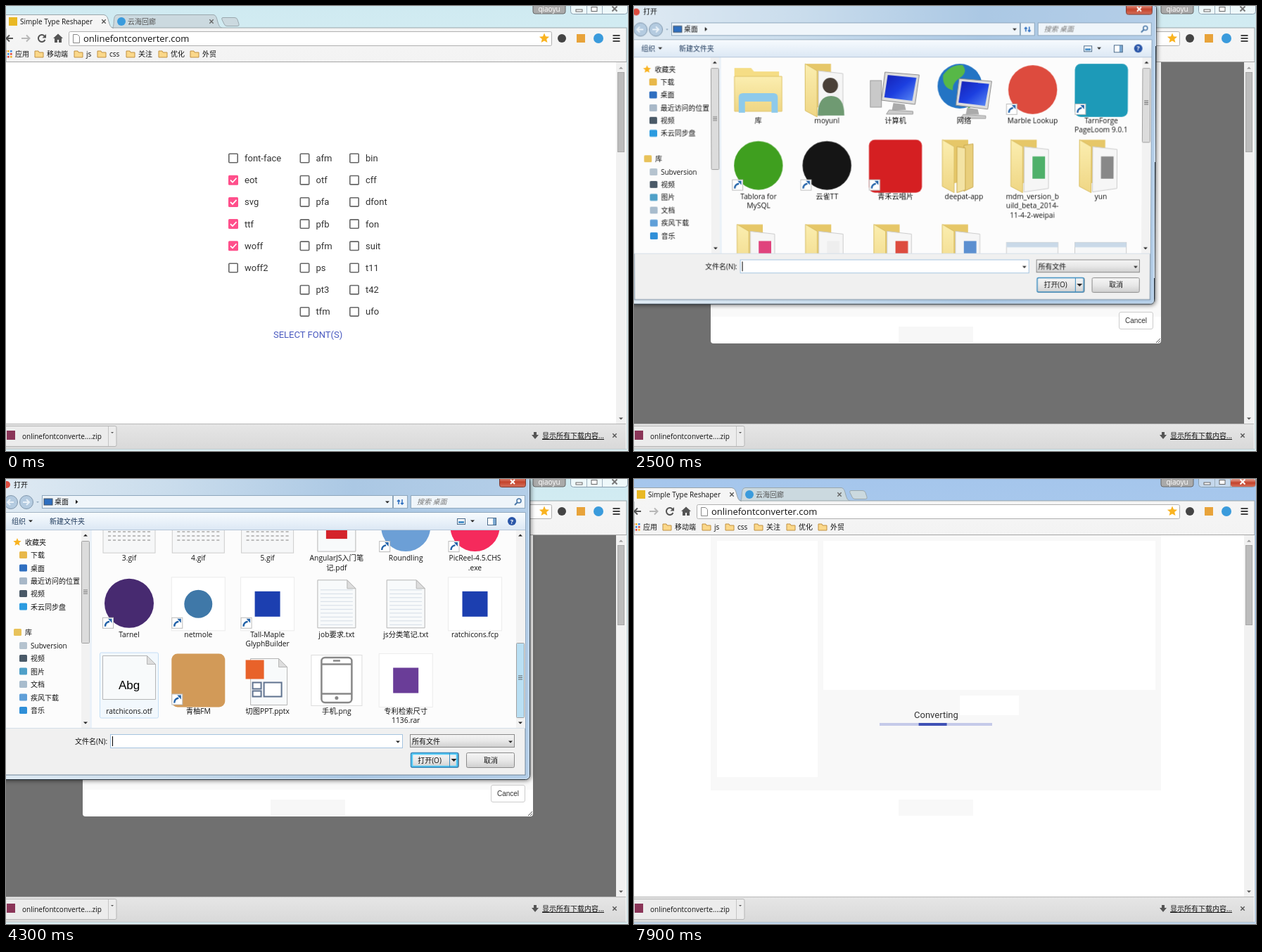
These frames come from a looping animation (884 px wide and 633 px high, 8000 ms). An HTML page:

```html
<!DOCTYPE html>
<html lang="zh-CN">
<head>
<meta charset="utf-8">
<title>Font upload</title>
<style>
html, body { margin: 0; width: 100%; height: 100%; overflow: hidden; background: #fff; }
svg.layer { position: absolute; left: 0; top: 0; overflow: visible; }
text { font-family: "Open Sans", "Noto Sans CJK SC", "Noto Sans CJK", sans-serif; white-space: pre; }
.page text { font-family: Roboto, sans-serif; }
.modal text, text.sample { font-family: "Liberation Sans", Arial, sans-serif; }
#dialog { transform-origin: 371px 213px; }
</style>
</head>
<body>
<script>
const rect = (x, y, w, h, fill, more = '') => `<rect x="${x}" y="${y}" width="${w}" height="${h}" fill="${fill}" ${more}/>`;
const circle = (x, y, r, fill, more = '') => `<circle cx="${x}" cy="${y}" r="${r}" fill="${fill}" ${more}/>`;
const path = (d, fill, more = '') => `<path d="${d}" fill="${fill}" ${more}/>`;
const line = (d, color, width = 1, more = '') => path(d, 'none', `stroke="${color}" stroke-width="${width}" ${more}`);
const text = (x, y, s, size = 10, fill = '#111', more = '') => `<text x="${x}" y="${y}" font-size="${size}" fill="${fill}" ${more}>${s}</text>`;
const group = (id, body, more = '') => `<g id="${id}" ${more}>${body}</g>`;
const at = (x, y, body) => `<g transform="translate(${x} ${y})">${body}</g>`;
const layer = (id, body) => `<svg class="layer" id="${id}" width="884" height="633">${body}</svg>`;
const gradient = (id, x2, y2, colors) => `<linearGradient id="${id}" x2="${x2}" y2="${y2}">${colors.map((c, i) =>
  `<stop offset="${i / (colors.length - 1)}" stop-color="${c}"/>`).join('')}</linearGradient>`;
const fade = (id, ...colors) => gradient(id, 0, 1, colors);
const down = (x, y, fill = '#222', s = 3) => path(`M${x - s} ${y - s / 2}h${2 * s}l${-s} ${s}z`, fill);
const up = (x, y, fill = '#222', s = 3) => path(`M${x - s} ${y + s / 2}h${2 * s}l${-s} ${-s}z`, fill);
const cross = (x, y, s, color, w = 1.4) => line(`M${x - s} ${y - s}l${2 * s} ${2 * s}m0 ${-2 * s}l${-2 * s} ${2 * s}`, color, w);
const star = (x, y, r) => path('M' + Array.from({ length: 10 }, (_, i) => {
  const a = i * Math.PI / 5, d = i % 2 ? r * .45 : r;
  return `${x + d * Math.sin(a)} ${y - d * Math.cos(a)}`;
}).join('L') + 'z', '#f9b320');
const tinyFolder = (x, y) => path(`M${x} ${y - 4}h5l1 2h6v7h-12z`, '#fbd88a', 'stroke="#c09040"');

// Browser window
const defs = `<defs>
  ${fade('idle', '#cfeaf1', '#eefafb', '#dff2f6')}${fade('active', '#a5c6ec', '#b9d3ef', '#c4d9f0')}
  ${fade('bar', '#f5f5f5', '#dedede')}${fade('shelf', '#e6e6e6', '#d9d9d9')}
  ${gradient('glass', 1, 0, ['#dfeaf3', '#c9dcec', '#abc8e4', '#b4cee8'])}${fade('tools', '#f7fbfe', '#dbe7f4')}
  ${fade('button', '#f5f5f5', '#e8e8e8', '#cfcfcf')}${fade('red', '#e6a697', '#c4432c', '#d4705c')}
  ${fade('cover', '#fbeeb0', '#efd684')}${gradient('screen', 1, 1, ['#1420b4', '#1c3fe0', '#5d8cf5'])}
</defs>`;

const winButton = id => rect(802.5, -4, 81, 15.5, id === 'on' ? '#c5d8ec' : '#eef8fa', 'rx="4" stroke="#8aa0b0"') +
  (id === 'on' ? rect(848, 0, 35, 11, 'url(#red)', 'rx="3"') : '') +
  line('M825.5 0v11M847.5 0v11', '#9fb2c0') + rect(810, 5, 9, 3, '#fff', 'stroke="#666"') +
  rect(832, 1.5, 8, 6, '#fff', 'stroke="#666"') +
  cross(865, 4, 3.5, id === 'on' ? '#fff' : '#777', 2);

const bookmarks = [[41, '移动端'], [97, 'js'], [130, 'css'], [171, '关注'], [217, '优化'], [262, '外贸']];
const dots = ['#e2483d', '#f3b32a', '#3f8de0'];

const browser = rect(0, 0, 884, 633, 'url(#idle)') +
  group('activeTitle', rect(0, 0, 884, 633, 'url(#active)') + winButton('on')) +
  group('idleTitle', winButton('off')) +
  rect(749, -4, 46, 15, '#aaa', 'rx="3" stroke="#666"') +
  text(772, 8, 'qiaoyu', 10, '#fff', 'text-anchor="middle"') +
  path('M150 31.5C156 31 150 13 158 12.5H295C302 13 299 31 308 31.5z', '#cbd9df', 'stroke="#9aa8ae"') +
  path('M308 16.500h17q3 0 4 3l2 6q1 3-2 3h-15q-3 0-4-3l-3-6q-1-3 1-3z', '#cbd9df', 'stroke="#9aa8ae"') +
  rect(0, 31, 882, 599, 'url(#bar)', 'stroke="#9aa5aa"') + rect(0, 80, 882, 550, '#fff') +
  path('M-5 32V13H139C148 13 144 31 153 32z', '#f5f5f5') + line('M0 12.500H139C148 13 144 31 153 31.500', '#9aa5aa') +
  rect(4, 16, 12, 12, '#e9b824') + text(20, 26, 'Simple Type Reshaper', 10) + cross(139, 22, 2.7, '#555') +
  circle(164, 22, 6, '#3a9bdc') + text(173, 26, '云海回廊', 10, '#555') + cross(292, 22, 2.7, '#666') +
  line('M10 46H1M5 41.500L0.500 46L5 50.500', '#555', 2) + line('M22 46H33M29 41.500L33.500 46L29 50.500', '#b8b8b8', 2) +
  line('M55 43A5 5 0 1 0 55.500 48', '#555', 2) + path('M57 40v5.500h-5.500z', '#555') +
  path('M74 39.500l7 6.500h-2v6h-4v-4h-2v4h-4v-6h-2z', '#555') +
  rect(89.5, 36.5, 686, 20, '#fff', 'rx="2" stroke="#b0b0b0"') +
  path('M95.500 40.500h6l3 3v9h-9z', '#fff', 'stroke="#888"') + text(110, 51, 'onlinefontconverter.com', 13) +
  star(765, 46, 7.5) + circle(790, 46, 6, '#444') + rect(811, 40, 12, 12, '#e8a33a') + circle(842, 46, 7, '#3a9bdc') +
  line('M862.500 42h10M862.500 46h10M862.500 50h10', '#444', 2) +
  [0, 1, 2, 3, 4, 5, 6, 7, 8].map(i => rect(-2 + i % 3 * 4, 63 + (i / 3 | 0) * 4, 2.6, 2.6, dots[(i + (i / 3 | 0)) % 3])).join('') +
  text(13, 72, '应用') + bookmarks.map(([x, s]) => tinyFolder(x, 68) + text(x + 17, 72, s)).join('') +
  rect(0, 79, 882, 1, '#a5a5a5') +
  rect(867, 80, 14, 514, '#f1f1f1') + up(874, 88, '#999') + down(874, 587, '#555') +
  rect(869.5, 94.5, 9, 113, '#bcbcbc', 'stroke="#a8a8a8"') +
  rect(0, 594, 881, 36, 'url(#shelf)') + rect(0, 594, 881, 1, '#b8b8b8') +
  rect(-3, 597.5, 160, 29, '#ececec', 'rx="2" stroke="#b5b5b5"') + line('M145.500 598v28', '#c4c4c4') +
  rect(1, 604, 12, 13, '#8a3558') + text(23, 615.5, 'onlinefontconverte....zip') + down(151, 607, '#555', 2) +
  path('M750 606h4v4h3l-5 6l-5-6h3z', '#555') +
  text(762, 615, '显示所有下载内容...', 10, '#111', 'text-decoration="underline"') + cross(865, 611, 2.7, '#555');

// Web page
const formats = [[316, 'font-face eot svg ttf woff woff2'], [417.5, 'afm otf pfa pfb pfm ps pt3 tfm'], [488, 'bin cff dfont fon suit t11 t42 ufo']];
const option = (x, y, name, on) => (on
  ? rect(x, y - 7, 14, 14, '#ff4f8b', 'rx="1.500"') + line(`M${x + 3} ${y}l3 3l5.500-6`, '#fff', 1.7)
  : rect(x + .8, y - 6.2, 12.4, 12.4, '#fff', 'rx="1" stroke="#666" stroke-width="1.600"')) + text(x + 23, y + 4.5, name, 13, '#333');
const form = formats.map(([x, names], c) => names.split(' ').map((name, i) =>
  option(x, 216.5 + 31.2 * i, name, !c && i > 0 && i < 5)).join('')).join('');
const page = group('form', form + group('hoverBox', rect(376, 456, 106, 23, '#f7f7f7')) +
    text(380, 472, 'SELECT FONT(S)', 13, '#4a5ac0', 'id="select"')) +
  group('working', rect(109, 80, 640, 363, '#f8f8f8') + rect(118, 88, 143, 336, '#fff') + rect(269, 88, 472, 212, '#fff') +
    rect(463, 308, 84, 28, '#fff') + rect(376, 456, 106, 23, '#f8f8f8') +
    group('progress', text(398, 340, 'Converting', 13, '#333') +
      `<svg x="349" y="347" width="160" height="4">${rect(0, 0, 160, 4, '#c5cae9')}${rect(0, 0, 40, 4, '#3f51b5', 'id="runner"')}</svg>`));

// Upload overlay
const button = (x, y, w, h, label, fill, stroke, color, size, id) =>
  rect(x + .5, y + .5, w - 1, h - 1, fill, `rx="2.500" stroke="${stroke}" id="${id}"`) +
  text(x + w / 2, y + h / 2 + size * .36, label, size, color, 'text-anchor="middle"');
const modal = rect(0, 80, 867, 514, '#000', 'opacity=".56"') +
  path('M109 80H749V476q0 4-4 4H113q-4 0-4-4z', '#fff') + group('tint', rect(109, 80, 640, 362, '#f9f9f9')) +
  rect(376, 456, 106, 23, '#f7f7f7') +
  rect(118, 88.5, 143, 335, '#f5f5f5', 'rx="3" stroke="#e3e3e3"') + rect(118, 93, 7, 28, '#08c') +
  text(136.5, 111, 'My device', 11.4, '#222') + text(130, 139.5, 'Link (URL)', 11.4, '#222') +
  rect(269.5, 88.5, 471, 211.5, '#f7f7f7', 'rx="3" stroke="#222" stroke-dasharray="3 2"') +
  text(414, 204, 'Drop files here', 27.9, '#333') +
  button(463, 308, 84, 28, 'Choose files', '#428bca', '#357ebd', '#fff', 11.4, 'choose') +
  group('cancel', button(602, 435, 49, 25, 'Cancel', '#fff', '#ccc', '#333', 10, 'cancelBox')) +
  group('chosen', path('M117.500 436.500h14l8 8v20h-22z', '#fff', 'stroke="#777"') +
    line('M131.500 436.500v8h8', '#777') + line('M120 447h16M120 451h17M120 455h17M120 441h9', '#bbb', 1.5) +
    text(143, 453.5, 'one file selected', 11.4, '#428bca') +
    button(654, 435, 42, 25, 'Clear', '#d9534f', '#d43f3a', '#fff', 10, 'clear') +
    group('done', button(699, 435, 42, 25, 'Done', '#5cb85c', '#4cae4c', '#fff', 10, 'doneBox'))) +
  line('M742 479l6-6M745 479l3-3', '#555');

// File icons, drawn around their centre
const sheet = (w, h, inner = '') => path(`M${-w / 2} ${-h / 2}h${w - 12}l12 12v${h - 12}h${-w}z`, '#f8fafb', 'stroke="#b5b5b5"') +
  path(`M${w / 2 - 12} ${-h / 2}v12h12z`, '#ddd', 'stroke="#b5b5b5"') + inner;
const card = inner => rect(-38, -38, 76, 76, '#fff', 'stroke="#ececec"') + inner;
const monitor = (x, y, s) => `<g transform="translate(${x} ${y}) scale(${s})">` +
  path('M-20-24L29-20L23 22L-25 16z', '#dedede', 'stroke="#888"') + path('M-16-20L25-16L19 17L-21 12z', 'url(#screen)') +
  path('M-8 20l16 2l2 8h-20z', '#aaa') + path('M-14 30l34 2v4h-38z', '#ccc', 'stroke="#999"') + '</g>';
const icons = {
  round: (c, r = 35) => circle(0, -1, r, c),
  square: (c, s = 76) => rect(-s / 2, -s / 2, s, s, c, `rx="${s / 9}"`),
  cardRound: c => card(circle(0, 0, 20, c)),
  cardSquare: c => card(rect(-18, -18, 36, 36, c)),
  folder: c => path('M-30-38H6V20L-30 28z', '#e6c768') +
    (c ? path('M-12-28L23-24V32L-12 37z', '#f6f6f6', 'stroke="#ccc"') + rect(0, -14, 18, 32, c)
      : path('M0-30L13-32V30L0 36z', '#e9cf7c', 'stroke="#c9a94e"') + path('M-10-28L2-26V34L-10 38z', '#f3e3a4', 'stroke="#c9a94e"')) +
    path('M-31-38L-14-28V38L-31 29z', 'url(#cover)', 'stroke="#d8bd62"'),
  library: () => path('M-34-32h24l4 5h36v56h-64z', '#f5dd85') + path('M-34-20H34V30H-34z', 'url(#cover)', 'stroke="#e0c468"') +
    path('M-28 32V10q0-6 6-6h44q6 0 6 6v22h-9V16h-38v16z', '#8ecaeb'),
  person: () => icons.folder('#f1f1f1') + circle(5, -7, 11, '#4a4038') + path('M-13 36q0-28 19-28t19 28z', '#6f9a72'),
  computer: () => rect(-36, -14, 16, 38, '#c9c9c9', 'stroke="#999"') + monitor(5, -2, 1),
  network: () => circle(-6, -6, 32, '#2374c4') + path('M-30-22q12-16 28-14q8 10-4 18t-10 18q-16-4-14-22zM2 4q16-8 22-2q-4 18-18 24z', '#57b847') + monitor(12, 6, .95),
  shot: () => rect(-37, -12, 74, 48, '#f6f7f8', 'stroke="#ccc"') + rect(-37, -12, 74, 7, '#c9d9e8') + line('M-30 6h60M-30 12h60M-30 18h60', '#bbb', 2, 'stroke-dasharray="4 3"'),
  page: c => sheet(54, 68, c ? rect(-15, -1, 30, 17, c) : line(Array.from({ length: 10 }, (_, i) => `M-23 ${-20 + i * 5.5}h46`).join(''), '#d4dde6')),
  font: () => at(0, -4, sheet(75, 62, `<text class="sample" y="16" text-anchor="middle" font-size="17">Abg</text>`)),
  slides: c => at(2, 2, sheet(52, 66)) + rect(-21, 3, 12, 9, '#fff', 'stroke="#60738f" stroke-width="2"') + rect(-5, 3, 25, 20, '#fff', 'stroke="#60738f" stroke-width="2"') +
    rect(-21, 15, 12, 8, '#fff', 'stroke="#60738f" stroke-width="2"') + rect(-31, -29, 26, 27, c),
  phone: () => rect(-36, -36, 72, 72, '#fff', 'stroke="#ddd"') + rect(-21.5, -32.5, 43, 64, '#fff', 'rx="5" stroke="#888" stroke-width="2.500"') +
    line('M-21-23h42M-21 19h42M-5-28h10', '#888', 2.5) + circle(0, 25, 2.5, '#888'),
};
const link = at(-38, 19, rect(.5, .5, 15, 15, '#fff', 'stroke="#bbb"') + line('M4 13Q4 7 10 6', '#2463a8', 2.4) + path('M8 2h5.500v6z', '#2463a8'));

// label, icon, colour, shortcut
const files = [
  ['库', 'library'], ['moyunl', 'person'], ['计算机', 'computer'], ['网络', 'network'], ['Marble Lookup', 'round', '#dd4b3e', 1], ['TarnForge|PageLoom 9.0.1', 'square', '#1d9ab8', 1],
  ['Tablora for|MySQL', 'round', '#3f9f1f', 1], ['云雀TT', 'round', '#151515', 1], ['青禾云唱片', 'square', '#d51f22', 1], ['deepat-app', 'folder'], ['mdm_version_b|uild_beta_2014-|11-4-2-weipai', 'folder', '#4fb06a'], ['yun', 'folder', '#888'],
  ['css', 'folder', '#e0437d'], ['demo', 'folder', '#eee'], ['html', 'folder', '#dd4b3e'], ['docs', 'folder', '#5b8fd0'], ['1.gif', 'shot'], ['2.gif', 'shot'],
  ['3.gif', 'shot'], ['4.gif', 'shot'], ['5.gif', 'shot'], ['AngularJS入门笔|记.pdf', 'page', '#d4232b'], ['Roundling', 'round', '#6c9fd6', 1], ['PicReel-4.5.CHS|.exe', 'round', '#f52a5c', 1],
  ['Tarnel', 'round', '#472a70', 1], ['netmole', 'cardRound', '#3f78a8', 1], ['Tall-Maple|GlyphBuilder', 'cardSquare', '#1c3fb0', 1], ['job要求.txt', 'page'], ['js分类笔记.txt', 'page'], ['ratchicons.fcp', 'cardSquare', '#1c3fb0'],
  ['ratchicons.otf', 'font'], ['青柚FM', 'square', '#d29a58', 1], ['切图PPT.pptx', 'slides', '#e8622a'], ['手机.png', 'phone'], ['专利检索尺寸|1136.rar', 'cardSquare', '#6a3d98']];
const place = i => [175 + i % 6 * 98.3, 120 + (i / 6 | 0) * 108.7 + (i > 11 ? 13 : 0)];
const hover = (id, i) => at(...place(i), rect(-41.5, -39.5, 83, 93, '#f2f8fd', `rx="2" stroke="#c4def5" id="${id}"`));
const fileItem = ([label, kind, color, shortcut], i) => at(...place(i), icons[kind](color) + (shortcut ? link : '') +
  label.split('|').map((s, n) => text(0, 47 + n * 13.5, s, 10.3, '#111', 'text-anchor="middle"')).join(''));

// Open dialog
const places = [['收藏夹', 94, '#f5a623'], ['下载', 112, '#e8b84a'], ['桌面', 130.5, '#2f6fc0'], ['最近访问的位置', 149, '#a8b8c8'], ['视频', 167, '#4a5a68'], ['禾云同步盘', 185.5, '#2b9be0'],
  ['库', 222, '#e8c25a'], ['Subversion', 241, '#b5c3cf'], ['视频', 259, '#4a5a68'], ['图片', 277.5, '#4fa0c8'], ['文档', 296, '#a8bccd'], ['疾风下载', 314.5, '#5f9fd8'], ['音乐', 333, '#2f8fd8']];
const placeItem = ([s, y, c], i) => {
  const x = i && i !== 6 ? 35 : 27;
  return (i ? rect(x - 16, y - 9, 11, 10, c, 'rx="1.500"') : star(16, y - 4, 6)) + text(x, y, s, 10);
};
const winBox = (x, w, s, cx) => rect(x + .5, 389.5, w, 21, 'url(#button)', 'rx="2" stroke="#8a8a8a"') + text(cx, 403.5, s, 10, '#111', 'text-anchor="middle"');
const dialog = rect(-10, -3, 754.5, 430.5, 'url(#glass)', 'rx="6" stroke="#26323d" style="filter:drop-shadow(1px 1px 3px #0008)"') +
  line('M743.500 0V422q0 4-4 4.500H0', '#e4f0fa', 1, 'opacity=".7"') +
  circle(1, 8, 5, '#dd4b3e') + text(11, 11.5, '打开') + rect(701.5, -3, 37, 14.5, 'url(#red)', 'rx="3" stroke="#7a3a30"') + cross(720, 4, 3, '#fff', 2) +
  circle(7, 33, 9.5, '#b4cbe0', 'stroke="#8198ad"') + circle(29, 33, 9.5, '#b4cbe0', 'stroke="#8198ad"') + down(45, 33, '#8fa8bd', 2) +
  line('M11 33H2M6 29l-4 4l4 4M24 33h9M29 29l4 4l-4 4', '#e9f1f8', 2) +
  rect(51.5, 23.5, 498, 18, '#eff5fa', 'stroke="#8ea7bd"') + rect(54, 28, 12, 9, '#2f6fc0', 'stroke="#456"') + text(69, 36, '桌面') +
  path('M99 29.500v6l3.500-3z', '#222') + down(542, 33) +
  rect(550.5, 23.5, 20, 18, '#eff5fa', 'stroke="#8ea7bd"') + line('M558 36v-6m-2 2l2-2l2 2M563 29v7m-2-2l2 2l2-2', '#2f6fc0', 1.5) +
  rect(575.5, 23.5, 162, 18, '#eff5fa', 'stroke="#8ea7bd"') + text(584, 36, '搜索 桌面', 10, '#777', 'font-style="italic"') +
  circle(729, 31, 3, 'none', 'stroke="#4a78a8" stroke-width="1.500"') + line('M727 33l-4 4', '#4a78a8', 2) +
  rect(-4, 48, 742, 373, '#f0f0f0', 'stroke="#6f8498"') +
  rect(-4, 48, 742, 25, 'url(#tools)') + rect(-4, 72, 742, 1, '#b5c6d8') +
  text(8, 64, '组织', 10, '#1e395b') + down(35, 60) + text(62, 64, '新建文件夹', 10, '#1e395b') +
  rect(641.5, 56.5, 11, 8, '#fff', 'stroke="#4a6a8a"') + rect(643, 60, 8, 3, '#4a90c8') + down(663, 60) +
  rect(684.5, 55.5, 12, 10, '#fff', 'stroke="#4a6a8a"') + rect(692, 56, 4, 9, '#7aa7d0') +
  circle(719, 60, 6, '#2a56a8') + text(719, 63.5, '?', 9, '#fff', 'text-anchor="middle" font-weight="700"') +
  rect(-4, 73, 742, 281, '#fcfcfc') + places.map(placeItem).join('') +
  rect(107, 73, 12, 281, '#f2f2f2') + up(113, 80) + down(113, 347) + rect(107.5, 88.5, 11, 145, '#dcdcdc', 'rx="1" stroke="#a0a0a0"') +
  line('M110 158h6M110 160.500h6M110 163h6', '#777') + rect(119, 73, 3, 281, '#eaf1f8') +
  `<svg x="122" y="73" width="603" height="281">${group('list', hover('hoverFirst', 11) + hover('hoverLast', 30) + files.map(fileItem).join(''))}</svg>` +
  rect(725, 73, 13, 281, '#f2f2f2') + up(731, 80) + down(731, 347) +
  group('thumb', rect(725.5, 88.5, 11, 106, '#dcdcdc', 'rx="1" stroke="#a0a0a0" id="thumbBox"') + line('M728 135h6M728 137.500h6M728 140h6', '#666')) +
  rect(-4, 354, 742, 1, '#d5dfe8') +
  text(98, 377, '文件名(N):') + rect(148.5, 363.5, 415, 19, '#fff', 'stroke="#a5c4e0"') + down(557, 374) +
  group('caret', rect(151, 366, 1, 14, '#000')) + text(152, 377, 'ratchicons.otf', 10, '#111', 'id="fileName"') +
  rect(574.5, 363.5, 148, 18, 'url(#button)', 'stroke="#8a8a8a"') + text(577, 377, '所有文件') + down(717, 374) +
  winBox(575, 68, '', 0) + rect(577, 391, 64, 18, 'none', 'rx="2" stroke="#55cdf8" stroke-width="2.500" id="pulse"') +
  rect(575.5, 389.5, 67, 20.5, 'none', 'rx="2" stroke="#3a8cc0" stroke-width="1.500"') + line('M630.500 390v20', '#3a8cc0') +
  text(602, 403.5, '打开(O)', 10, '#111', 'text-anchor="middle"') + down(636.5, 400, '#222', 4) +
  winBox(654, 68, '取消', 689);

document.body.innerHTML = layer('window', defs + browser + group('page', page, 'class="page"') + group('modal', modal, 'class="modal"')) + layer('dialog', dialog);

const el = id => document.getElementById(id);
const show = (id, on) => { el(id).style.display = on ? '' : 'none'; };
const move = (id, x, y) => el(id).setAttribute('transform', `translate(${x} ${y})`);
const paint = (id, color) => el(id).setAttribute('fill', color);
const clamp = v => Math.max(0, Math.min(1, v));
const ease = v => (1 - Math.cos(Math.PI * v)) / 2;

// Opening and closing pose of the dialog: [depth of the tilt, opacity]
function dialogPose(t) {
  if (t < 2300 || t >= 5000) return [1, 0];
  if (t < 2600) return [[1, .25], [.4, .75], [.1, 1]][(t - 2300) / 100];
  if (t >= 4800) return t < 4900 ? [.5, .4] : [1, .03];
  return [0, 1];
}

const start = performance.now();
function frame() {
  const t = Math.floor((performance.now() - start) % 8000 / 100) * 100;
  const between = (a, b) => t >= a && t < b;

  const active = between(1200, 2300) || t >= 4800;
  show('activeTitle', active);
  show('idleTitle', !active);

  show('form', t < 6700);
  show('hoverBox', t >= 800);
  paint('select', t < 800 ? '#4a5ac0' : '#3f51b5');
  show('working', t >= 6700);
  show('progress', t >= 7000);
  el('runner').setAttribute('x', -40 + 200 * ease((t - 6414) / 1000 % 1));

  const picked = t >= 4800;
  show('modal', between(1200, 6800));
  el('modal').style.opacity = t < 1300 || t >= 6700 ? .5 : 1;
  show('tint', t >= 2300);
  paint('choose', between(1700, 4800) || between(5900, 6000) ? '#3276b1' : '#428bca');
  move('cancel', picked ? 0 : 87, 0);
  show('chosen', picked);
  const size = clamp(.38 + (t - 4900) / 300);
  el('done').setAttribute('transform', `translate(720 447.5) scale(${size}) translate(-720 -447.5)`);
  paint('doneBox', t >= 6200 ? '#47a447' : '#5cb85c');

  const [k, opacity] = dialogPose(t);
  show('dialog', opacity > 0);
  el('dialog').style.opacity = opacity;
  el('dialog').style.transform = k ? `translateY(${-7 * k}px) perspective(800px) translateZ(${-74 * k}px) rotateX(${-7.5 * k}deg)` : 'none';
  const scroll = clamp((t - 3000) / 800);
  move('list', -122, -73 - 390 * scroll);
  move('thumb', 0, 145 * scroll);
  paint('thumbBox', between(3100, 4500) ? '#b9dff3' : '#dcdcdc');
  show('hoverFirst', between(2700, 3100));
  show('hoverLast', t >= 4100);
  paint('hoverLast', t >= 4500 ? '#d5e9fb' : '#f2f8fd');
  show('fileName', t >= 4500);
  show('caret', t < 4500 && Math.floor(t / 530) % 2 === 0);
  el('pulse').style.opacity = ease(Math.max(0, t - 3000) / 1300);

  requestAnimationFrame(frame);
}
frame();
</script>
</body>
</html>
```
